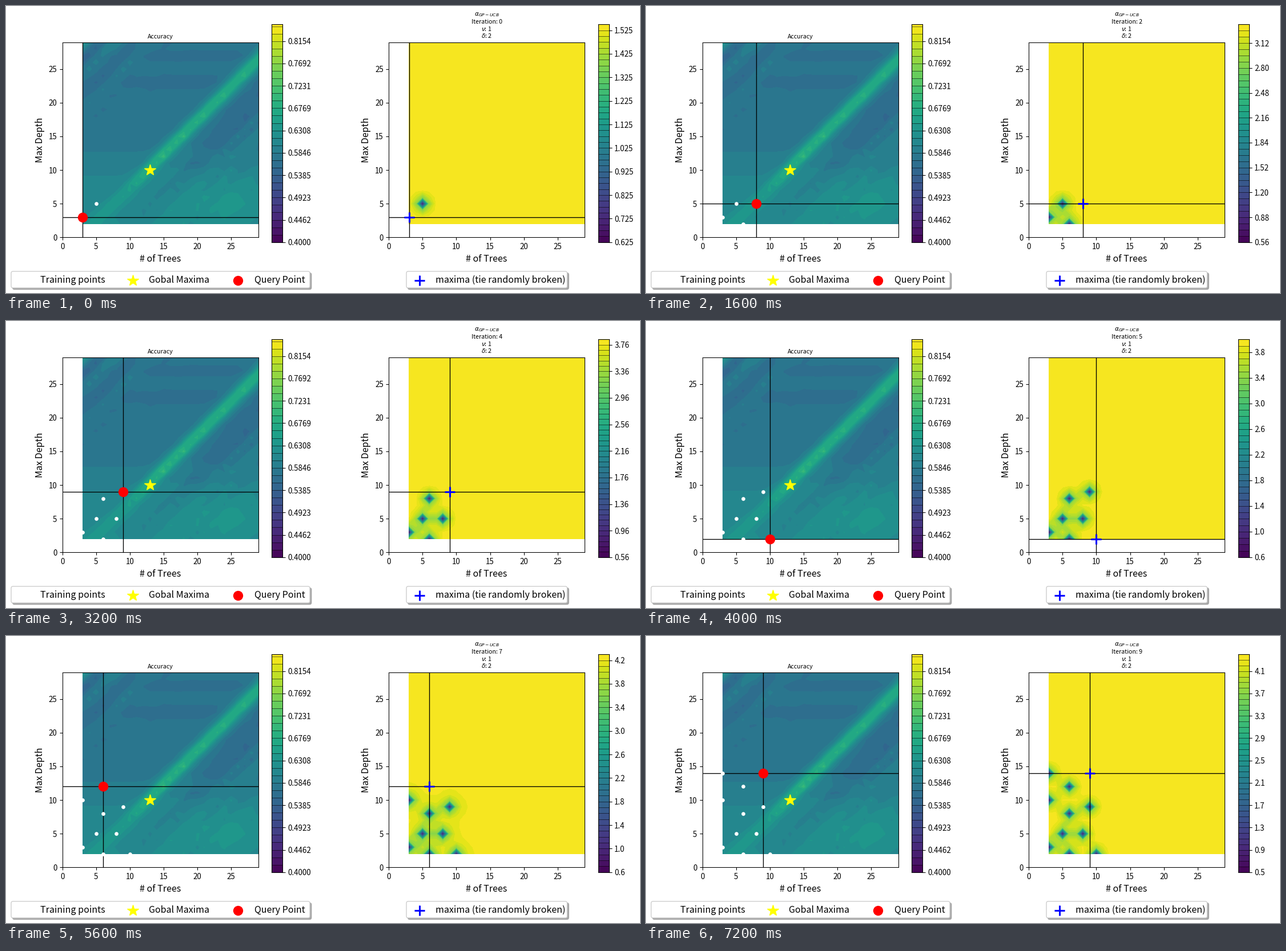
Animation of 1110x504 px, one loop 8 s. Source, as a matplotlib script:

```python
import numpy as np
import matplotlib.pyplot as plt
from matplotlib.animation import FuncAnimation
from matplotlib.colors import Normalize
from matplotlib.patches import FancyBboxPatch

W, H, DPI = 1110, 504, 96
plt.rcParams.update({"font.family": "Noto Sans CJK JP", "font.size": 10,
                     "mathtext.fontset": "dejavusans", "axes.linewidth": 0.8})

# Sampled points in order; the first is known before the search starts.
POINTS = np.array([(5, 5), (3, 3), (6, 2), (8, 5), (6, 8), (9, 9), (10, 2),
                   (3, 10), (6, 12), (3, 14), (9, 14)], float)
# Per iteration: lowest level, level step, bins, value far from any sample, label format
SCALES = [(0.625, 0.025, 37, 1.537, "%.3f"), (0.60, 0.06, 38, 2.821, "%.2f"),
          (0.56, 0.08, 35, 3.305, "%.2f"), (0.56, 0.08, 39, 3.6013, "%.2f"),
          (0.56, 0.08, 41, 3.812, "%.2f"), (0.6, 0.1, 34, 3.972, "%.1f"),
          (0.6, 0.1, 36, 4.1015, "%.1f"), (0.6, 0.1, 37, 4.21, "%.1f"),
          (0.6, 0.1, 38, 4.3015, "%.1f"), (0.5, 0.1, 39, 4.384, "%.1f")]
X, Y = np.meshgrid(np.arange(3, 30), np.arange(2, 30))

fig = plt.figure(figsize=(W / DPI, H / DPI), dpi=DPI, facecolor="white")


def pixel_axes(x0, y0, x1, y1):
    return fig.add_axes([x0 / W, 1 - y1 / H, (x1 - x0) / W, (y1 - y0) / H])


def accuracy():
    """Diagonal ridge on a slope, with streaky noise on both sides."""
    rng = np.random.default_rng(4)
    d = X - Y
    raw = np.pad(rng.normal(size=X.shape), 2, mode="reflect")
    rows, cols = X.shape
    noise = sum(raw[2 + s:2 + s + rows, 2 + s:2 + s + cols] for s in (-2, -1, 0, 1, 2)) / 2.2
    z = 0.567 + 0.052 / (1 + np.exp((Y - 10.5) / 3.3))
    z += 0.02 * np.exp(-((X - 25) / 7) ** 2 - ((Y - 5) / 4) ** 2)
    height = 0.03 + 0.085 / (1 + np.exp(-(X - 11.5) / 1.4))
    z += height * np.exp(-((d - 2.6) / (1.15 + 0.012 * X)) ** 2)
    z += 0.014 * ((d == 3) & (X > 13) & (X % 3 == 0))
    lower = 1 / (1 + np.exp(-(d - 5.5) * 2))
    upper = 1 / (1 + np.exp((d + 15) / 1.5))
    z += 0.008 * noise * (lower + upper)
    z -= 0.013 * lower * np.exp(-((d - 9) / 2) ** 2)
    z += 0.012 * upper * np.cos(2 * np.pi * (d + 26) / 5)
    z += 0.06 * np.exp(-((d + 26) / 1.2) ** 2)
    z += 0.002 * rng.normal(size=(rows, 1))
    return z


def matern(a, b):
    r = np.sqrt(5) * np.linalg.norm(a[:, None] - b[None], axis=-1)
    return (1 + r + r * r / 3) * np.exp(-r)


def acquisition(i):
    """Upper confidence bound after i queries."""
    low, step, _, far, _ = SCALES[i]
    known = POINTS[:i + 1]
    k = matern(np.column_stack([X.ravel(), Y.ravel()]).astype(float), known)
    gain = np.sum(k * np.linalg.solve(matern(known, known), k.T).T, axis=1)
    sigma = np.sqrt(np.clip(1 - gain, 0, 1)).reshape(X.shape)
    beta = 2 * np.log((i + 1) ** 3 * np.pi ** 2 / 6)
    return np.maximum(far - np.sqrt(beta) * (1 - sigma), low + step / 2)


def draw_colorbar(ax, levels, top, every, fmt):
    ax.clear()
    mids = (levels[:-1] + levels[1:]) / 2
    ax.pcolormesh([0, 1], levels, mids[:, None], cmap="viridis",
                  norm=Normalize(levels[0], top))
    ax.hlines(levels[1:-1], 0, 1, colors="black", lw=0.4)
    ax.set(xlim=(0, 1), ylim=(levels[0], top), xticks=[])
    ticks = [v for v in levels[::every] if v <= top + 1e-9]
    ax.yaxis.tick_right()
    ax.set_yticks(ticks, [fmt % v for v in ticks])


def style_plot(ax):
    ax.set(xlim=(0, 29), ylim=(0, 29), xticks=range(0, 30, 5), yticks=range(0, 30, 5))
    ax.set_autoscale_on(False)


def crosshair(ax):
    return (ax.axvline(0, color="black", lw=1, zorder=2.1),
            ax.axhline(0, color="black", lw=1, zorder=2.1))


left = pixel_axes(98.7, 63.5, 441.5, 406.3)
left_bar = pixel_axes(465, 32.3, 484.3, 414.8)
right = pixel_axes(670.2, 63.5, 1013, 406.3)
right_bar = pixel_axes(1036.7, 32.3, 1056, 414.8)
overlay = fig.add_axes([0, 0, 1, 1], zorder=5)
overlay.set(xlim=(0, W), ylim=(H, 0))
overlay.axis("off")

STAR = dict(marker="*", ms=15, color="yellow", ls="none")
QUERY = dict(marker="o", ms=12, color="red", ls="none")
PLUS = dict(marker="+", ms=13, mew=2.3, color="blue", ls="none")


def label(x, y, text, size=12, ha="center", rotation=0):
    return overlay.text(x, y, text, fontsize=size, ha=ha, va="baseline",
                        rotation=rotation, rotation_mode="anchor")


def legend_box(x0, x1):
    for shift, face, edge in ((2.67, "#a6a6a6", "#a6a6a6"), (0, "white", "#cccccc")):
        overlay.add_patch(FancyBboxPatch(
            (x0 + shift, 466 + shift), x1 - x0, 29, lw=1, fc=face, ec=edge,
            boxstyle="round,pad=0,rounding_size=3.2"))


# Fixed parts
accuracy_levels = np.linspace(0.4, 1, 40)
left.contourf(X, Y, accuracy(), levels=accuracy_levels, cmap="viridis",
              norm=Normalize(0.4, 0.85))
draw_colorbar(left_bar, accuracy_levels[:31], 0.85, 3, "%.4f")
for axes, x_mid, x_side in ((left, 270, 63.5), (right, 841.6, 635)):
    style_plot(axes)
    label(x_mid, 449, "# of Trees")
    label(x_side, 235.5, "Max Depth", rotation=90)
label(270, 57, "Accuracy", 8)
label(841.6, 17, r"$\alpha_{GP-UCB}$", 8)
iteration = label(841.6, 31, "", 8)
label(841.6, 44, r"$\nu$: 1", 8)
label(841.6, 56, r"$\delta$: 2", 8)

legend_box(9, 532)
legend_box(701, 982.5)
for x, text in ((60.5, "Training points"), (250.5, "Gobal Maxima"),
                (435, "Query Point"), (752, "maxima (tie randomly broken)")):
    label(x, 486.3, text, ha="left")
for x, marker in ((222, STAR), (406, QUERY), (723.5, PLUS)):
    overlay.plot(x, 481.5, **marker)

# Moving parts
crosses = [crosshair(left), crosshair(right)]
training, = left.plot([], [], "o", color="white", ms=4, zorder=3)
left.plot(13, 10, zorder=3.1, **STAR)
query, = left.plot([], [], zorder=3.2, **QUERY)
maxima, = right.plot([], [], zorder=3.2, **PLUS)


def update(i):
    low, step, bins, _, fmt = SCALES[i]
    levels = low + step * np.arange(bins + 1)
    for artist in list(right.collections):
        artist.remove()
    right.contourf(X, Y, acquisition(i), levels=levels, cmap="viridis")
    style_plot(right)
    draw_colorbar(right_bar, levels, levels[-1], -(-len(levels) // 10), fmt)

    x, y = POINTS[i + 1]
    for vertical, horizontal in crosses:
        vertical.set_xdata([x, x])
        horizontal.set_ydata([y, y])
    training.set_data(*POINTS[:i + 1].T)
    query.set_data([x], [y])
    maxima.set_data([x], [y])
    iteration.set_text(f"Iteration: {i}")
    return []


anim = FuncAnimation(fig, update, frames=len(SCALES), interval=800,
                     repeat=True, repeat_delay=0, blit=False)
plt.show()
```
